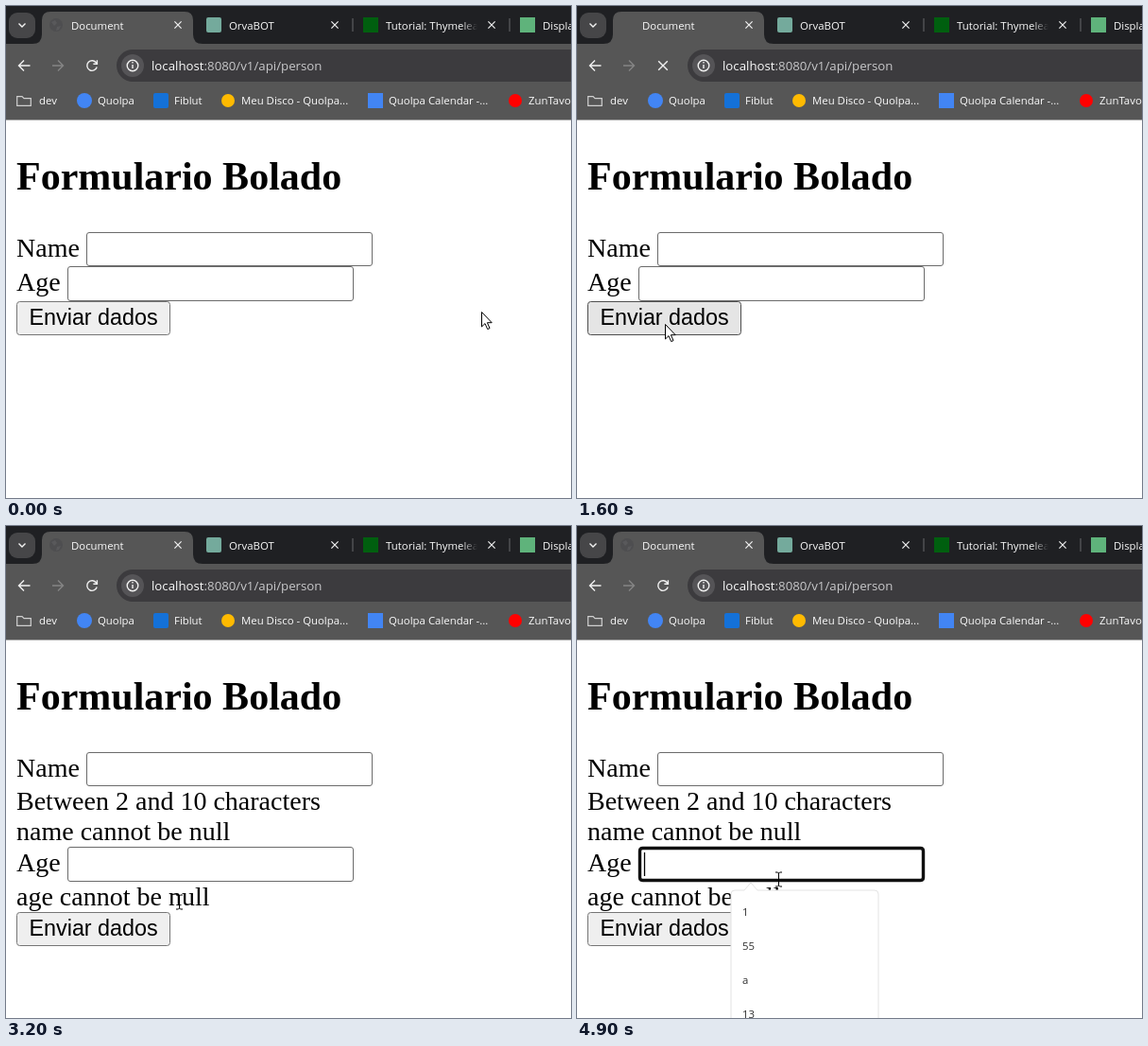
These frames come from a looping animation (598 by 520 pixels, 5000 ms). An HTML page:

```html
<!DOCTYPE html>
<html lang="pt">
<head>
<meta charset="utf-8">
<title>Document</title>
<style>
  html, body { margin: 0; width: 100%; height: 100%; overflow: hidden; background: #fff; }
  svg { display: block; width: 100vw; height: 100vh; }
  .ui { font: 11.4px "Open Sans", "Noto Sans", sans-serif; fill: #fafafa; }
  .url { font-size: 13.25px; fill: #c8c8ca; }
  .page { font: 28px "Liberation Serif", "Times New Roman", serif; }
  .line { fill: none; stroke: #f1f1f1; stroke-width: 1.4; }
  .field { fill: #fff; stroke: #6b6b6b; }
</style>
</head>
<body>
<svg viewBox="0 0 598 520">
  <defs>
    <linearGradient id="fade">
      <stop offset="0" stop-color="#1f2023" stop-opacity="0"/>
      <stop offset=".7" stop-color="#1f2023"/>
    </linearGradient>
    <path id="close" class="line" d="M-3.6-3.6 3.6 3.6M3.6-3.6-3.6 3.6" style="stroke-width:1.2"/>
  </defs>
  <rect width="598" height="520" fill="#fff"/>

  <g class="ui">
    <rect width="598" height="41" fill="#1f2023"/>
    <path d="M0 40H28Q38 40 38 30V15Q38 6 47 6H189Q198 6 198 15V30Q198 40 208 40H598V120.6H0Z" fill="#565656"/>
    <rect x="3" y="7" width="28" height="27" rx="9" fill="#464648"/>
    <path class="line" d="M13.5 18.5 17 22l3.5-3.5"/>
    <g id="globe">
      <circle cx="53" cy="20" r="7" fill="#4e4e50"/>
      <path d="M48 17l4-2 2 3-3 3ZM54 22l4-1-2 4-3 1Z" fill="#59595b"/>
    </g>
    <text x="69" y="24.5">Document</text>
    <rect x="212" y="12" width="16" height="16" rx="2" fill="#74aa9c"/>
    <text x="236" y="24.5">OrvaBOT</text>
    <rect x="378" y="12" width="16" height="16" fill="#005f0f"/>
    <text x="402" y="24.5">Tutorial: Thymeleaf</text>
    <rect x="482" y="8" width="24" height="26" fill="url(#fade)"/>
    <rect x="544" y="12" width="16" height="16" fill="#5fb37b"/>
    <text x="568" y="24.5">Displaying</text>
    <path d="M367 13v14M533 13v14" stroke="#58585b" stroke-width="1.3"/>
    <use href="#close" x="182" y="20"/>
    <use href="#close" x="348" y="20"/>
    <use href="#close" x="514" y="20"/>

    <path class="line" d="M25.5 63H14M19 57.5 13.5 63 19 68.5"/>
    <path class="line" d="M49 63H60.5M55 57.5 60.5 63 55 68.5" style="stroke:#858585"/>
    <path id="reload" class="line" d="M95.6 60.2A5.3 5.3 0 1 0 96.2 64.5M96.4 57.3v4h-4"/>
    <path id="stop" class="line" d="M86.2 58.2l9.6 9.6M95.8 58.2l-9.6 9.6"/>
    <rect x="117" y="46" width="520" height="34" rx="17" fill="#3c3b3e"/>
    <circle cx="134" cy="63" r="12" fill="#555457"/>
    <circle class="line" cx="134" cy="63" r="5.8"/>
    <path class="line" d="M134 62v4M134 59v1.6"/>
    <text class="url" x="154" y="67.5"><tspan fill="#fafafa">localhost</tspan>:8080/v1/api/person</text>

    <path class="line" d="M11.7 104V95.7H17l2 2H26.3V105.3H11.7Z" style="stroke:#d0d0d0;stroke-width:1.2"/>
    <text x="35" y="104">dev</text>
    <circle cx="83" cy="100" r="8" fill="#4285f4"/>
    <text x="97" y="104">Quolpa</text>
    <rect x="156" y="92" width="16" height="16" rx="2" fill="#1471d8"/>
    <text x="178" y="104">Fiblut</text>
    <circle cx="235" cy="100" r="7" fill="#ffba00"/>
    <text x="249" y="104">Meu Disco - Quolpa...</text>
    <rect x="383" y="92" width="16" height="16" fill="#4285f4"/>
    <text x="405" y="104">Quolpa Calendar -...</text>
    <circle cx="539" cy="100" r="7" fill="#f00"/>
    <text x="553" y="104">ZunTavo</text>
  </g>

  <g class="page">
    <text x="11" y="194" font-size="42" font-weight="bold">Formulario Bolado</text>
    <text x="11" y="265">Name</text>
    <rect class="field" x="85.5" y="239.5" width="302" height="35" rx="2.5"/>
    <g id="errors">
      <text x="11" y="300">Between 2 and 10 characters</text>
      <text x="11" y="332">name cannot be null</text>
      <text x="11" y="401">age cannot be null</text>
    </g>
    <g id="age">
      <text x="11" y="301">Age</text>
      <rect class="field" x="65.5" y="275.5" width="302" height="36" rx="2.5"/>
      <g id="focus">
        <rect x="66.5" y="276.5" width="300" height="34" rx="3" fill="none" stroke="#101010" stroke-width="3.4"/>
        <path d="M71.5 281v25" stroke="#000" stroke-width="1.3"/>
      </g>
    </g>
    <g id="button">
      <rect id="face" x="11.5" y="312.5" width="162" height="35" rx="3"/>
      <text x="24.5" y="337" style="font:23.33px 'Liberation Sans',Arial,sans-serif">Enviar dados</text>
    </g>
  </g>

  <g id="popup" class="ui">
    <path d="M167 385H177L184 377 191 385H315Q319 385 319 389V530H163V389Q163 385 167 385Z" fill="#fff" stroke="#e3e3e3"/>
    <g fill="#303030">
      <text x="175" y="412">1</text>
      <text x="175" y="448">55</text>
      <text x="175" y="484">a</text>
      <text x="175" y="520">13</text>
    </g>
  </g>

  <path id="arrow" d="M.5.5V16L4 12.6 6.7 18.6 9 17.6 6.4 11.7H11.2Z" fill="#fff" stroke="#000"/>
  <path id="beam" d="M-3.5-7.5H-1L0-6.5 1-7.5H3.5M0-6.5V6.5M-3.5 7.5H-1L0 6.5 1 7.5H3.5" fill="none" stroke="#000"/>
</svg>
<script>
const LOOP = 5000, STEP = 100;
// Pointer path: time, x, y
const path = [
  [0, 503, 323], [300, 300, 331], [600, 130, 330], [900, 105, 368], [1200, 94, 338],
  [1600, 93, 336], [1900, 96, 338], [2000, 105, 344], [2100, 120, 322], [2400, 220, 322],
  [2600, 310, 295], [2800, 100, 320], [3000, 90, 396], [3200, 183, 397], [3500, 60, 397],
  [3700, 190, 397], [4000, 105, 395], [4200, 120, 414], [4600, 213, 373], [LOOP, 213, 373]
];
const el = id => document.getElementById(id);
const show = (id, on) => el(id).style.display = on ? '' : 'none';
const move = (id, x, y) => el(id).setAttribute('transform', `translate(${x} ${y})`);

function pointerAt(t) {
  const i = path.findIndex(key => key[0] > t);
  const [t0, x0, y0] = path[i - 1], [t1, x1, y1] = path[i];
  const k = (t - t0) / (t1 - t0);
  return [x0 + (x1 - x0) * k, y0 + (y1 - y0) * k].map(Math.round);
}

function draw(now) {
  const t = Math.floor(now % LOOP / STEP) * STEP;
  const [x, y] = pointerAt(t);
  const loading = t >= 1600 && t < 1900;
  const failed = t >= 1900;
  const focused = t >= 4700;
  const top = failed ? 408 : 312;
  const hover = x > 11 && x < 174 && y > top && y < top + 36;
  const text = failed && !hover;

  show('globe', !loading);
  show('reload', !loading);
  show('stop', loading);
  show('errors', failed);
  show('focus', focused);
  show('popup', focused);
  move('age', 0, failed ? 64 : 0);
  move('button', 0, top - 312);
  el('face').setAttribute('fill', hover ? '#e5e5e5' : '#efefef');
  el('face').setAttribute('stroke', hover ? '#4f4f4f' : '#767676');
  show('arrow', !text);
  show('beam', text);
  move(text ? 'beam' : 'arrow', text ? x + .5 : x, text ? y + .5 : y);
  requestAnimationFrame(draw);
}
draw(0);
</script>
</body>
</html>
```
